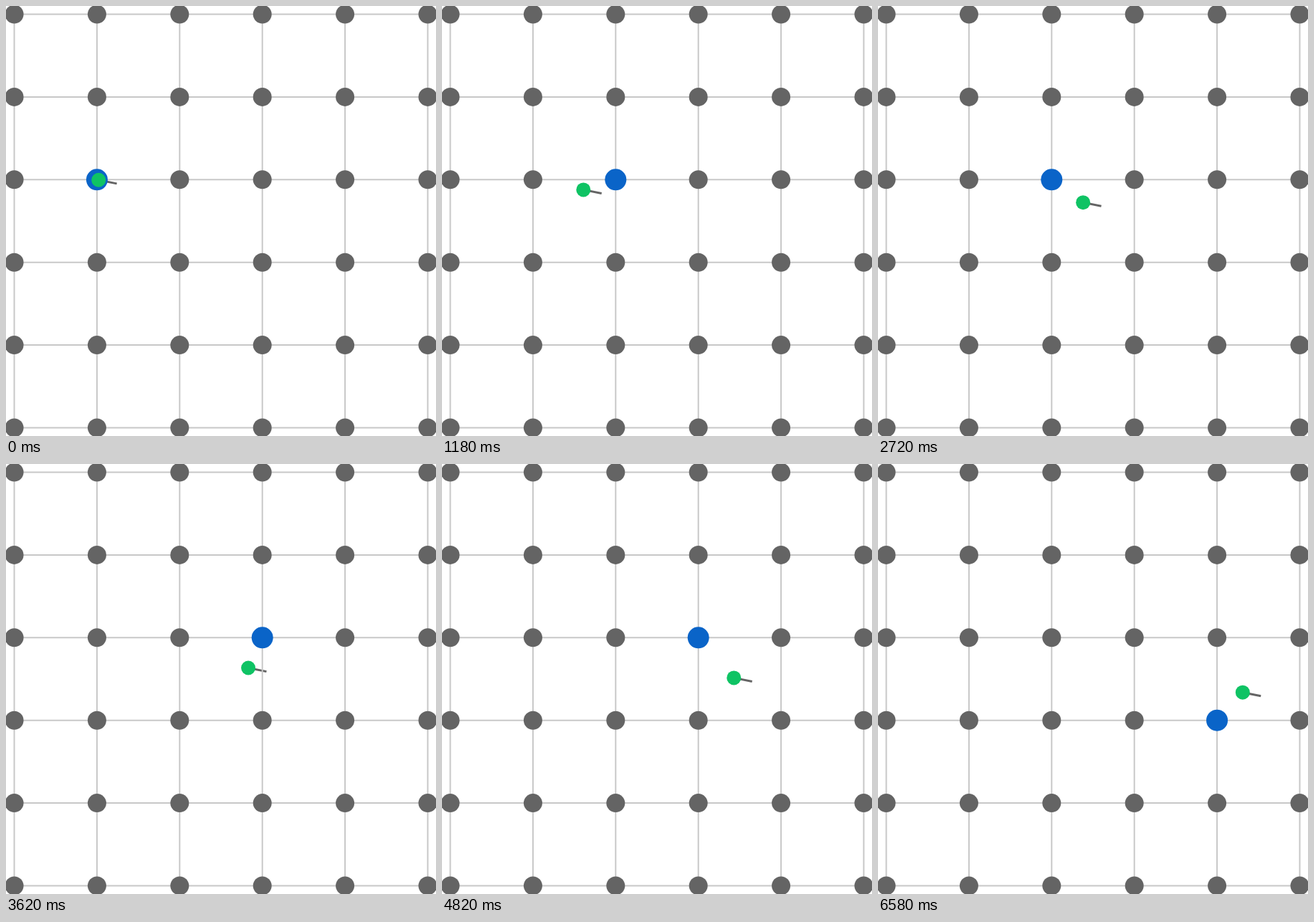
Animation of 600 by 600 pixels, one loop 6600 ms. Source, as an HTML page with a canvas:

```html
<!DOCTYPE html>
<html lang="en">
<head>
<meta charset="utf-8">
<title>Nearest grid node</title>
<style>
  html, body { margin: 0; width: 100%; height: 100%; overflow: hidden; background: #fff; }
  canvas { display: block; width: 600px; height: 600px; }
</style>
</head>
<body>
<canvas id="stage" width="600" height="600"></canvas>
<script>
const ctx = document.getElementById('stage').getContext('2d');
const LOOP = 6600, STEP = 20;
const NODES = 6, MARGIN = 0.1, UNIT = 600 / 5.2;
const START = { x: 1.02, y: 2.004 };
const SPEED = { x: 0.01, y: 0.002 };
const POINTER = 22; // pointer length, in steps of travel

const px = v => (v + MARGIN) * UNIT;

function line(x1, y1, x2, y2, width, color) {
  ctx.beginPath();
  ctx.moveTo(px(x1), px(y1));
  ctx.lineTo(px(x2), px(y2));
  ctx.lineWidth = width;
  ctx.strokeStyle = color;
  ctx.stroke();
}

function dot(x, y, radius, color) {
  ctx.beginPath();
  ctx.arc(px(x), px(y), radius, 0, Math.PI * 2);
  ctx.fillStyle = color;
  ctx.fill();
}

function draw(time) {
  const step = Math.floor((time % LOOP) / STEP);
  const x = START.x + SPEED.x * step;
  const y = START.y + SPEED.y * step;
  const nearX = Math.round(x), nearY = Math.round(y);
  const last = NODES - 1;

  ctx.fillStyle = '#fff';
  ctx.fillRect(0, 0, 600, 600);

  // The pointer lies beneath the grid.
  line(x, y, x + SPEED.x * POINTER, y + SPEED.y * POINTER, 3, '#646464');

  for (let i = 0; i < NODES; i++) {
    line(i, 0, i, last, 2, '#c8c8c8');
    line(0, i, last, i, 2, '#c8c8c8');
  }
  for (let i = 0; i < NODES; i++) {
    for (let j = 0; j < NODES; j++) {
      const near = i === nearX && j === nearY;
      dot(i, j, near ? 15 : 13, near ? '#0a64c8' : '#646464');
    }
  }
  dot(x, y, 10, '#0fc364');
}

const began = performance.now();
function tick() {
  draw(performance.now() - began);
  requestAnimationFrame(tick);
}
tick();
</script>
</body>
</html>
```
